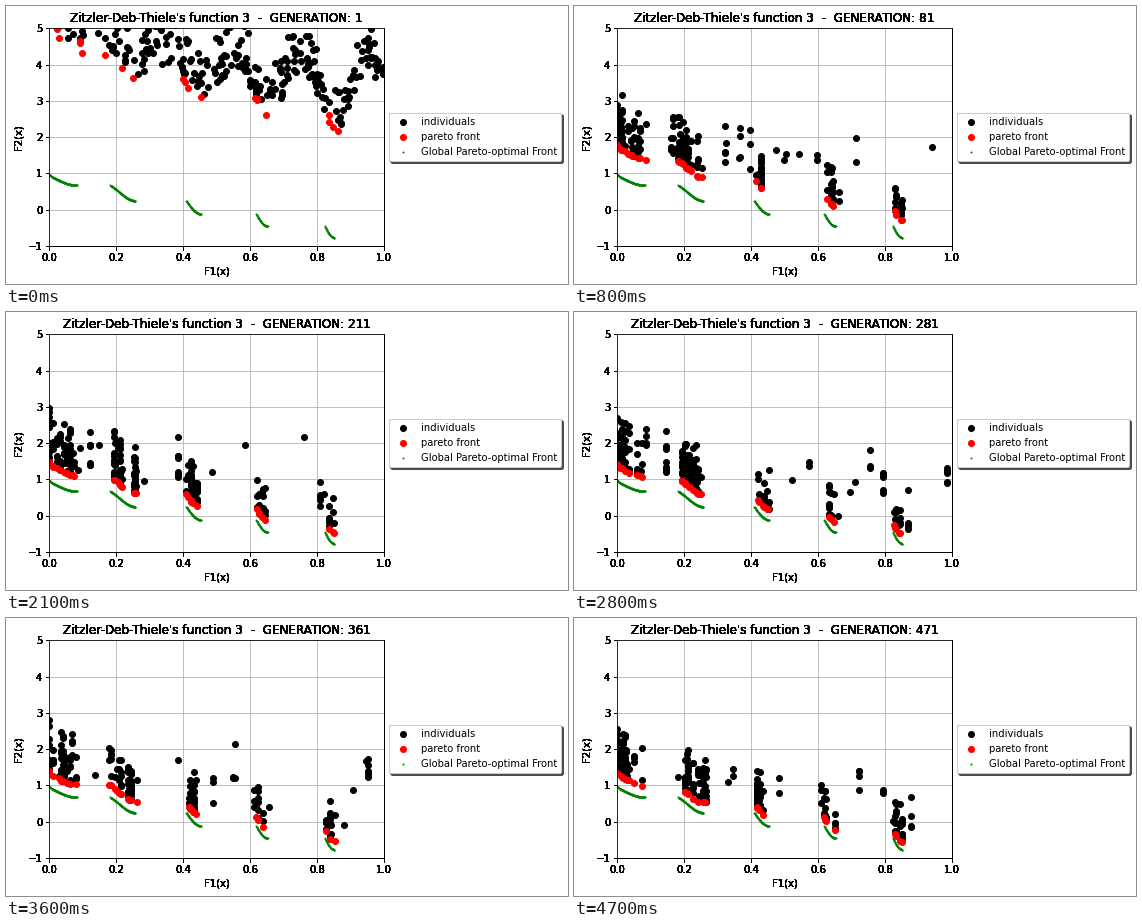
A matplotlib script that plays this animation: 562 px wide and 278 px high, repeating every 4.8 s.

```python
import numpy as np
import matplotlib.pyplot as plt
from matplotlib.animation import FuncAnimation

W, H, DPI = 562, 278, 72
FRAMES, STEP = 48, 10
LAYERS = 12  # stacked axes: labels outside the plot come out heavier


def zdt3(x, g=1.0):
    return g - np.sqrt(x * g) - x * np.sin(10 * np.pi * x)


def non_dominated(x, y):
    """Mask of the points with no other point both left of and below them."""
    order = np.lexsort((y, x))
    low = np.minimum.accumulate(y[order])
    mask = np.zeros(x.size, bool)
    mask[order] = np.r_[True, low[1:] < low[:-1]]
    return mask


grid = np.arange(0.0015, 1, 0.001)
optimal_x = grid[non_dominated(grid, zdt3(grid))]


def best_g(k):
    return 1.32 + 3.0 * np.exp(-k / 2.5) + 0.6 * np.exp(-k / 15)


def population(k):
    rng = np.random.default_rng(100 + k)
    early = np.exp(-k / 2)

    # columns share one x: on the optimal pieces, at x = 0, or astray
    pieces = rng.choice(optimal_x, int(38 * (1 - early)))
    pieces = np.clip(pieces + rng.normal(0, .005, pieces.size), 0, 1)
    cols = np.r_[np.zeros(int(4 * (1 - early))), pieces]
    astray = rng.uniform(.08, 1, int(13 * (1 - early)))
    x = np.r_[np.repeat(cols, rng.geometric(.22, cols.size)),
              np.repeat(astray, rng.geometric(.35, astray.size))]
    rise = .08 + 1.65 * rng.beta(1, 2.2, x.size)

    # early generations are scattered evenly over x
    loose = rng.uniform(.01, 1, int(300 * early))
    x = np.r_[cols, x, loose]
    rise = np.r_[rng.uniform(0, .05, cols.size), rise,
                 (1.4 + early) * rng.beta(1.6, 3, loose.size)]
    return x, zdt3(x, best_g(k) + rise)


def make_axes(fig):
    ax = fig.add_axes([43.2 / W, 38.2 / H, 334.8 / W, 217.44 / H])
    ax.set(xlim=(0, 1), ylim=(-1, 5), xlabel="F1(x)", ylabel="F2(x)",
           xticks=np.linspace(0, 1, 6), yticks=range(-1, 6))
    ax.grid(True)
    inds, = ax.plot([], [], "ko", label="individuals")
    front, = ax.plot([], [], "ro", label="pareto front")
    ax.plot(optimal_x, zdt3(optimal_x), "go", ms=1,
            label="Global Pareto-optimal Front")
    ax.legend(loc="center left", bbox_to_anchor=(1, 0.5), shadow=True)
    return ax, inds, front


fig = plt.figure(figsize=(W / DPI, H / DPI), dpi=DPI, facecolor="white")
layers = [make_axes(fig) for _ in range(LAYERS)]
_, ind_dots, front_dots = layers[-1]


def update(k):
    x, y = population(k)
    best = non_dominated(x, y)
    ind_dots.set_data(x[~best], y[~best])
    front_dots.set_data(x[best], y[best])
    for ax, *_ in layers:
        ax.set_title("Zitzler-Deb-Thiele's function 3  -  "
                     f"GENERATION: {1 + STEP * k}", y=1.0)
    return ind_dots, front_dots


anim = FuncAnimation(fig, update, frames=FRAMES, interval=100,
                     repeat=True, repeat_delay=0, blit=False)
plt.show()
```
